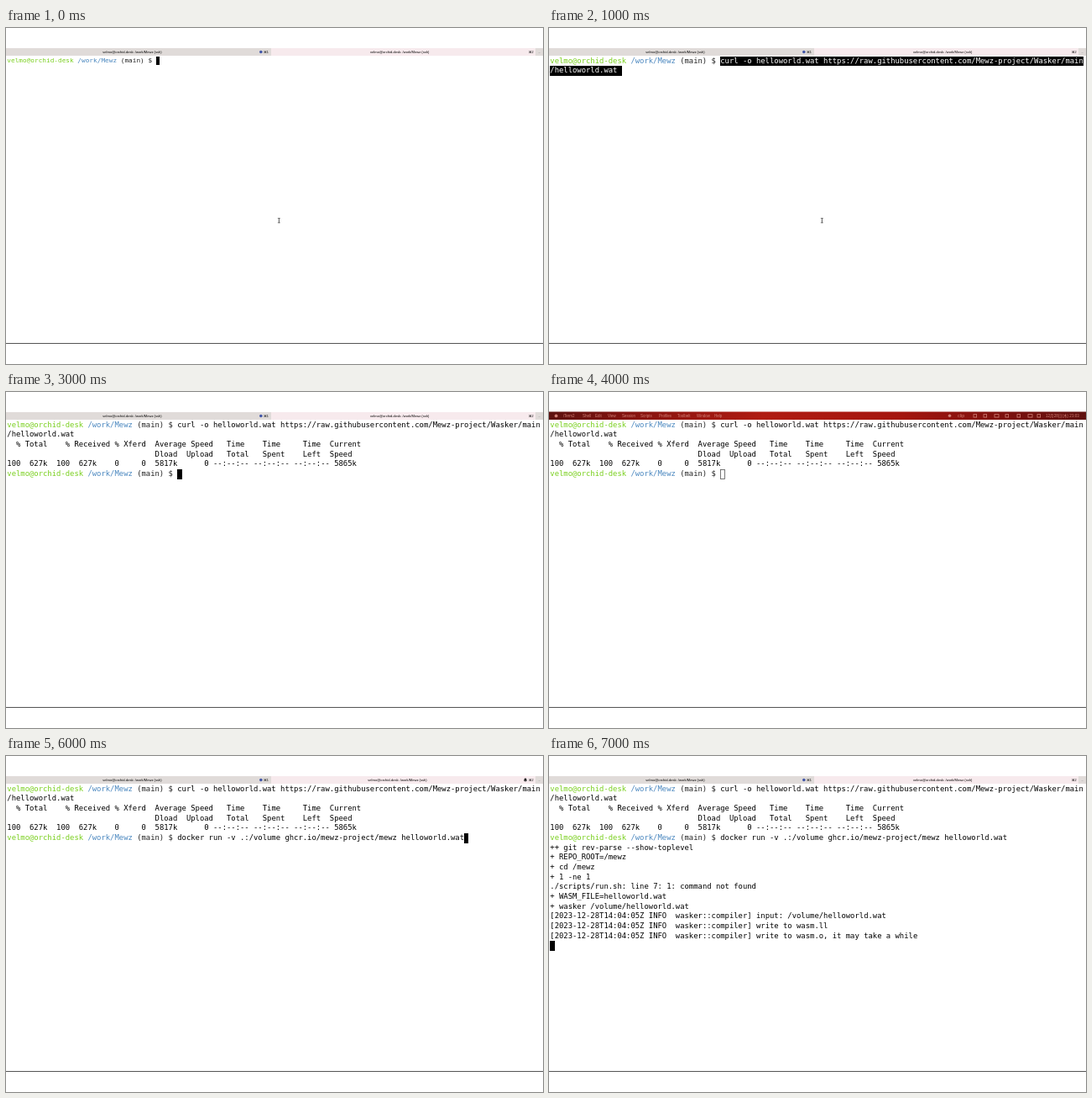
Recreate the animation shown at these times as an HTML page with a canvas. Size 640x400 px, loop 8 s.

```html
<!DOCTYPE html>
<html lang="en">
<head>
<meta charset="utf-8">
<title>Terminal session</title>
<style>
  html, body { margin: 0; width: 100%; height: 100%; overflow: hidden; background: #fff; }
  canvas { display: block; }
</style>
</head>
<body>
<canvas id="stage" width="640" height="400"></canvas>
<script>
const ctx = document.getElementById('stage').getContext('2d');
const LOOP = 8000, LEFT = 1.3, TOP = 33.6, ROW = 11.66;
const MONO = '"DejaVu Sans Mono", monospace';
const SANS = '"Liberation Sans", "DejaVu Sans", "Noto Sans CJK JP", sans-serif';
const USER = 'velmo@orchid-desk', DIR = '/work/Mewz';
const PROMPT_COLS = 38;
const curl = ['curl -o helloworld.wat https://raw.githubusercontent.com/Mewz-project/Wasker/main',
  '/helloworld.wat'];
const download = [
  '  % Total    % Received % Xferd  Average Speed   Time    Time     Time  Current',
  '                                 Dload  Upload   Total   Spent    Left  Speed',
  '100  627k  100  627k    0     0  5817k      0 --:--:-- --:--:-- --:--:-- 5865k'];
const docker = 'docker run -v .:/volume ghcr.io/mewz-project/mewz helloworld.wat';
const log = '[2023-12-28T14:04:05Z INFO  wasker::compiler] ';
const output = [
  '++ git rev-parse --show-toplevel',
  '+ REPO_ROOT=/mewz',
  '+ cd /mewz',
  '+ 1 -ne 1',
  './scripts/run.sh: line 7: 1: command not found',
  '+ WASM_FILE=helloworld.wat',
  '+ wasker /volume/helloworld.wat',
  log + 'input: /volume/helloworld.wat',
  log + 'write to wasm.ll',
  log + 'write to wasm.o, it may take a while'];

let pitch = 5.34, rowHeight = ROW;

function rect(x, y, w, h, color) {
  ctx.fillStyle = color;
  ctx.fillRect(x, y, w, h);
}

function dot(x, y, r, color) {
  ctx.fillStyle = color;
  ctx.beginPath();
  ctx.arc(x, y, r, 0, 7);
  ctx.fill();
}

// Scaling a large font keeps fractional glyph advances.
function label(str, x, y, scale, color, family = SANS, align = 'left') {
  ctx.save();
  ctx.translate(x, y);
  ctx.scale(scale, scale);
  ctx.font = `100px ${family}`;
  ctx.textAlign = align;
  ctx.fillStyle = color;
  ctx.fillText(str, 0, 0);
  ctx.restore();
}

const colX = col => LEFT + col * pitch;
const rowY = row => TOP + row * rowHeight;

// Whole-pixel box around a run of character cells.
function cells(col, row, count) {
  const x = Math.round(colX(col)), y = Math.round(rowY(row));
  return [x, y, Math.round(colX(col + count)) - x, Math.round(rowY(row + 1)) - y];
}

function write(str, col, row, color = '#000') {
  label(str, colX(col), rowY(row) + rowHeight * .7, pitch / 60.2, color, MONO);
}

function selected(str, col, row) {
  rect(...cells(col, row, str.length), '#000');
  write(str, col, row, '#fff');
}

function prompt(row) {
  write(USER, 0, row, '#79cf1d');
  write(DIR, 18, row, '#4a87bf');
  write('(main) $', 29, row, '#222');
}

function cursor(col, row, hollow) {
  const [x, y, w, h] = cells(col, row, 1);
  if (!hollow) return rect(x, y, w, h, '#000');
  ctx.strokeStyle = '#555';
  ctx.lineWidth = .8;
  ctx.strokeRect(x + .5, y + .5, w - 1, h - 1);
}

function pointer(x, y) {
  rect(x - .4, y - 3, .8, 6, '#333');
  rect(x - 1.5, y - 3, 3, .7, '#555');
  rect(x - 1.5, y + 2.3, 3, .7, '#555');
}

function tabs(bell) {
  const title = `${USER}: ${DIR} (ssh)`;
  rect(0, 24, 316, 9, '#e0dbd9');
  rect(316, 24, 315, 9, '#f7eaed');
  rect(631, 24, 9, 9, '#e0dbd9');
  label(title, 150.5, 29.8, .041, '#000', SANS, 'center');
  label(title, bell ? 466.5 : 469.2, 29.8, .041, '#000', SANS, 'center');
  dot(303.8, 28.5, 1.8, '#4257a8');
  label('⌘1', 307, 29.9, .038, '#000');
  label('⌘2', 622.7, 29.9, .038, '#000');
  label('–', 634.5, 29.8, .04, '#888');
  if (bell) {
    dot(619, 28, 1.4, '#222');
    rect(617.2, 28.5, 3.6, 1.2, '#222');
    dot(619, 30, .6, '#222');
  }
}

function menuBar() {
  const shade = ctx.createLinearGradient(0, 0, 640, 0);
  [[0, '#5c1210'], [.15, '#85130f'], [.4, '#b01c12'], [.65, '#a5160f'], [.85, '#7c110e'], [1, '#5e100e']]
    .forEach(([stop, color]) => shade.addColorStop(stop, color));
  rect(0, 23.5, 640, 9.5, shade);
  const ink = '#cf7e74';
  dot(8.5, 28.4, 1.9, ink);
  const items = ['iTerm2', 'Shell', 'Edit', 'View', 'Session', 'Scripts', 'Profiles', 'Toolbelt', 'Window', 'Help'];
  const places = [17, 40, 55, 70, 87, 109, 131, 153, 176, 197];
  items.forEach((item, i) => label(item, places[i], 30, .045, ink));
  dot(477.5, 28.3, 1.8, ink);
  label('clip', 487, 30.2, .055, ink);
  ctx.strokeStyle = ink;
  ctx.lineWidth = .8;
  for (const x of [506, 518, 531, 544, 558, 571, 582]) ctx.strokeRect(x, 26.6, x % 2 ? 5 : 3.6, 3.5);
  label('12月28日(木) 23:03', 592, 30.2, .046, ink);
}

function draw(time) {
  const step = Math.floor(time % LOOP / 1000);
  rect(0, 0, 640, 400, '#fff');
  rect(0, 375, 640, 1, '#555');
  if (step === 4) menuBar();
  else tabs(step === 2 || step === 6);

  pitch = step ? 5.34 : 4.67;
  rowHeight = step ? ROW : 10.2;
  prompt(0);
  if (step < 2) pointer(325.3, 229.2);
  if (step === 0) return cursor(PROMPT_COLS, 0);

  const putCurl = step === 1 ? selected : write;
  putCurl(curl[0], PROMPT_COLS, 0);
  putCurl(curl[1] + ' ', 0, 1);
  if (step === 2) cursor(15, 1);
  if (step < 3) return;

  download.forEach((line, i) => write(line, 0, 2 + i));
  prompt(5);
  if (step < 5) return cursor(PROMPT_COLS, 5, step === 4);

  (step === 5 ? selected : write)(docker + ' ', PROMPT_COLS, 5);
  if (step === 5) pointer(357.2, 152.9);
  if (step === 6) cursor(PROMPT_COLS + docker.length, 5);
  if (step === 7) {
    output.forEach((line, i) => write(line, 0, 6 + i));
    cursor(0, 16);
  }
}

function tick() {
  draw(performance.now());
  requestAnimationFrame(tick);
}
tick();
</script>
</body>
</html>
```
